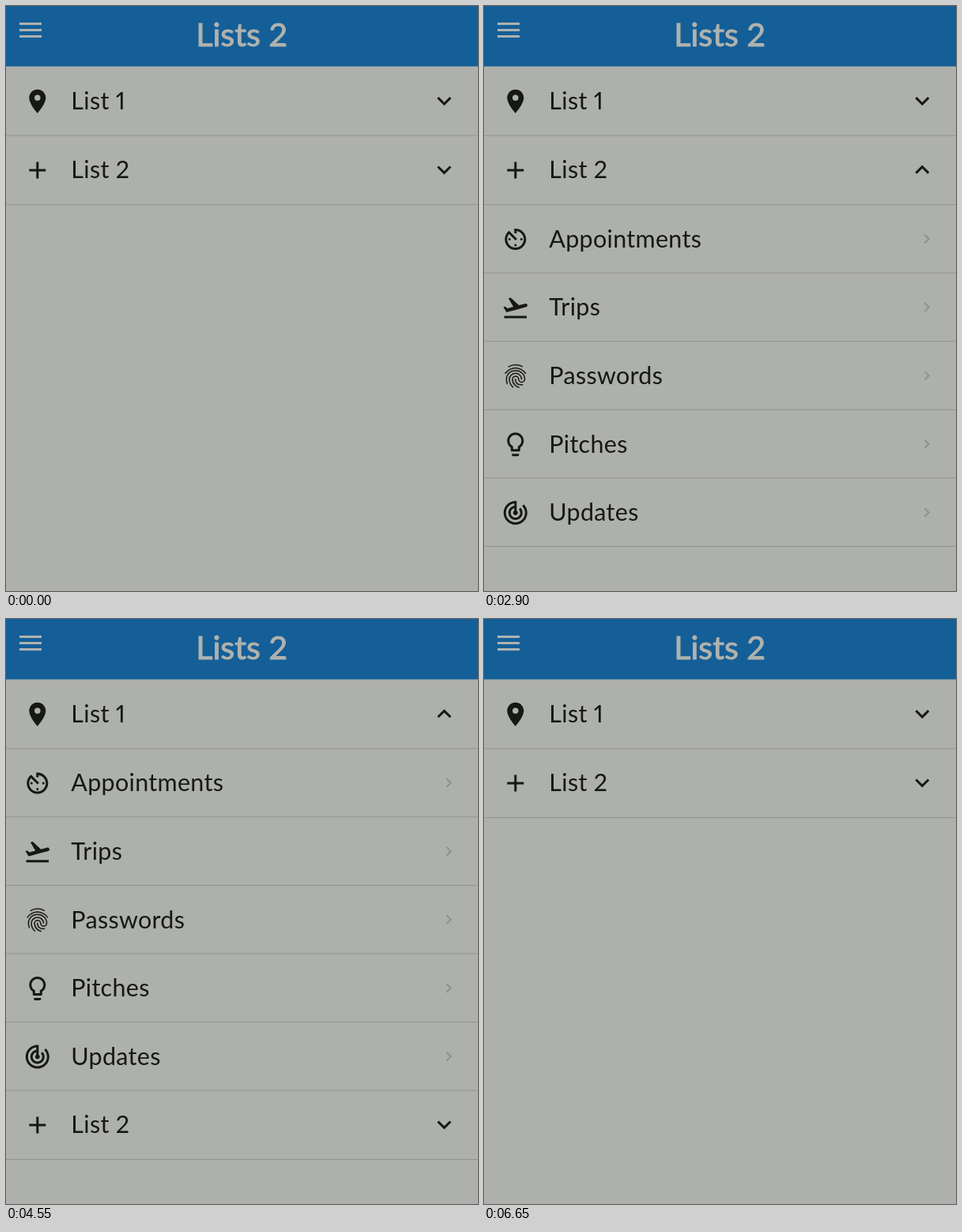
An HTML page that plays this animation: 597 px wide and 741 px high, repeating every 6.7 s.

```html
<!DOCTYPE html>
<html lang="en">
<head>
<meta charset="utf-8">
<title>Lists</title>
<style>
  html, body { margin: 0; width: 100%; height: 100%; overflow: hidden; background: #aeb0ac; }
  svg { display: block; width: 100%; height: 100%; }
  text {
    font: 30.5px Lato, "Open Sans", sans-serif; font-variant-numeric: proportional-nums;
    letter-spacing: .3px; fill: #161815;
  }
  .title {
    font-size: 41.3px; letter-spacing: 0; text-anchor: middle;
    fill: #b0b2ae; stroke: #b0b2ae; stroke-width: 1;
  }
  .icon { fill: #161815; }
  .line { fill: none; stroke: #161815; stroke-linecap: round; }
  .rule { fill: #929491; }
  .next { fill: #8e908d; }
</style>
</head>
<body>
<svg id="stage" viewBox="0 0 597 741"></svg>
<script>
const LOOP = 6700, DURATION = 300, MAX_HEIGHT = 500;
const TOP = 76.5, HEAD = 87.4, ROW = 86.6, CONTENT = 5 * ROW;
const PRESS = [4150, 4260];
const DOWN = 'M7.41 8.59L12 13.17l4.59-4.58L18 10l-6 6-6-6z';
const NEXT = 'M10 6L8.59 7.41 13.17 12l-4.58 4.59L10 18l6-6z';

const icons = {
  pin: 'M12 2C8.13 2 5 5.13 5 9c0 5.25 7 13 7 13s7-7.75 7-13c0-3.87-3.13-7-7-7zm0 9.5a2.5 2.5 0 0 1 0-5 2.5 2.5 0 0 1 0 5z',
  plus: 'M19 13h-6v6h-2v-6H5v-2h6V5h2v6h6z',
  timer: 'M11 17c0 .55.45 1 1 1s1-.45 1-1-.45-1-1-1-1 .45-1 1zm0-14v4h2V5.08c3.39.49 6 3.39 6 6.92 0 3.87-3.13 7-7 7s-7-3.13-7-7c0-1.68.59-3.22 1.58-4.42L12 13l1.41-1.41-6.8-6.8v.02C4.42 6.45 3 9.05 3 12c0 4.97 4.02 9 9 9 4.97 0 9-4.03 9-9s-4.03-9-9-9h-1zm7 9c0-.55-.45-1-1-1s-1 .45-1 1 .45 1 1 1 1-.45 1-1zM6 12c0 .55.45 1 1 1s1-.45 1-1-.45-1-1-1-1 .45-1 1z',
  plane: 'M2.5 19h19v2h-19zm19.57-9.36c-.21-.8-1.04-1.28-1.84-1.06L14.92 10l-6.9-6.43-1.93.51 4.14 7.17-4.97 1.33-1.97-1.54-1.45.39 1.82 3.16.77 1.33 1.6-.43 5.31-1.42 4.35-1.16L21 11.49c.81-.23 1.28-1.05 1.07-1.85z',
  print: 'M6.3 4.1C8 3.1 9.9 2.5 12 2.5s3.9.5 5.7 1.5'
    + 'M3.5 9.7c1-1.4 2.25-2.5 3.75-3.27 3-1.55 6.5-1.55 9.5 0 1.5.77 2.75 1.87 3.75 3.25'
    + 'M9.75 21.3c-.9-.9-1.3-1.4-1.95-2.55-.65-1.15-.97-2.56-.97-4.1 0-2.7 2.31-4.89 5.17-4.89s5.17 2.19 5.17 4.89'
    + 'M14.9 21.5c-1.5-.4-2.4-.95-3.4-1.95-1.3-1.3-2-3-2-4.87 0-1.35 1.16-2.44 2.58-2.44s2.58 1.1 2.58 2.44c0 1.35 1.16 2.44 2.58 2.44s2.58-1.1 2.58-2.44c0-4.05-3.48-7.33-7.75-7.33-3.04 0-5.8 1.7-7.06 4.32-.42.88-.64 1.9-.64 3.01 0 .83.08 2.15.72 3.8'
    + 'M12 14.7c0 3.1 2.1 4.7 4.9 4.7.25 0 .6-.02.95-.08',
  bulb: 'M9 21c0 .55.45 1 1 1h4c.55 0 1-.45 1-1v-1H9v1zm3-19C8.14 2 5 5.14 5 9c0 2.38 1.19 4.47 3 5.74V17c0 .55.45 1 1 1h6c.55 0 1-.45 1-1v-2.26c1.81-1.27 3-3.36 3-5.74 0-3.86-3.14-7-7-7zm2.85 11.1l-.85.6V16h-4v-2.3l-.85-.6A5 5 0 0 1 7 9c0-2.76 2.24-5 5-5s5 2.24 5 5c0 1.63-.8 3.16-2.15 4.1z',
  radar: 'M19.07 4.93l-1.41 1.41C19.1 7.79 20 9.79 20 12c0 4.42-3.58 8-8 8s-8-3.58-8-8c0-4.08 3.05-7.44 7-7.93v2.02C8.16 6.57 6 9.03 6 12c0 3.31 2.69 6 6 6s6-2.69 6-6c0-1.66-.67-3.16-1.76-4.24l-1.41 1.41C15.55 9.9 16 10.9 16 12c0 2.21-1.79 4-4 4s-4-1.79-4-4c0-1.86 1.28-3.41 3-3.86v2.14c-.6.35-1 .98-1 1.72 0 1.1.9 2 2 2s2-.9 2-2c0-.74-.4-1.38-1-1.72V2h-1C6.48 2 2 6.48 2 12s4.48 10 10 10 10-4.48 10-10c0-2.76-1.12-5.26-2.93-7.07z'
};

const items = [
  ['timer', 'Appointments'], ['plane', 'Trips'], ['print', 'Passwords'],
  ['bulb', 'Pitches'], ['radar', 'Updates']
];
const lists = [
  { icon: 'pin', label: 'List 1', open: 4212, close: 5045 },
  { icon: 'plus', label: 'List 2', open: 1972, close: 3214 }
];

function row(icon, label, height, end) {
  const kind = icon === 'print' ? 'line' : 'icon';
  return `<path class="${kind}" fill-rule="evenodd" transform="translate(21.8 26.2) scale(1.5)" d="${icons[icon]}"/>
    <text x="82.3" y="54.6">${label}</text>${end}
    <rect class="rule" y="${height - .3}" width="597" height="1"/>`;
}

const subRows = items.map(([icon, label], i) =>
  `<g transform="translate(0 ${HEAD + i * ROW})">${row(icon, label, ROW,
    `<path class="next" transform="translate(548 31.7)" d="${NEXT}"/>`)}</g>`).join('');

const listMarkup = lists.map((list, i) =>
  `<clipPath id="clip${i}"><rect id="window${i}" y="${HEAD}" width="597" height="0"/></clipPath>
  <g id="list${i}">
    <g clip-path="url(#clip${i})">${subRows}</g>
    ${row(list.icon, list.label, HEAD, `<path id="arrow${i}" class="icon" d="${DOWN}"/>`)}
  </g>`).join('');

const bars = [21, 29, 37].map(y =>
  `<rect x="17" y="${y}" width="28" height="3" fill="#b0b2ae"/>`).join('');

const byId = id => document.getElementById(id);
byId('stage').innerHTML = `<rect width="597" height="741" fill="#aeb0ac"/>
  ${listMarkup}
  <rect id="press" y="${TOP}" width="597" height="${HEAD}" fill="#505250" opacity=".31"/>
  <rect width="597" height="${TOP}" fill="#145f98"/>${bars}
  <text class="title" x="298" y="51">Lists 2</text>`;

// CSS "ease": cubic-bezier(.25, .1, .25, 1)
function ease(x) {
  if (x <= 0) return 0;
  if (x >= 1) return 1;
  const curve = (a, b, s) => 3 * a * s * (1 - s) ** 2 + 3 * b * s * s * (1 - s) + s ** 3;
  let low = 0, high = 1;
  for (let i = 0; i < 20; i++) {
    const s = (low + high) / 2;
    if (curve(.25, .25, s) < x) low = s; else high = s;
  }
  return curve(.1, 1, low);
}

function draw(now) {
  const t = now % LOOP;
  let y = TOP;
  lists.forEach((list, i) => {
    const amount = ease((t - list.open) / DURATION) - ease((t - list.close) / DURATION);
    const height = Math.min(CONTENT, amount * MAX_HEIGHT);
    byId('list' + i).setAttribute('transform', `translate(0 ${y})`);
    byId('window' + i).setAttribute('height', height && height + 1);
    byId('arrow' + i).setAttribute('transform',
      `translate(536.3 25.7) scale(1.5) rotate(${-180 * amount} 12 12)`);
    y += HEAD + height;
  });
  byId('press').style.display = t >= PRESS[0] && t < PRESS[1] ? '' : 'none';
}

let start;
function tick(now) {
  start ??= now;
  draw(now - start);
  requestAnimationFrame(tick);
}
draw(0);
requestAnimationFrame(tick);
</script>
</body>
</html>
```
